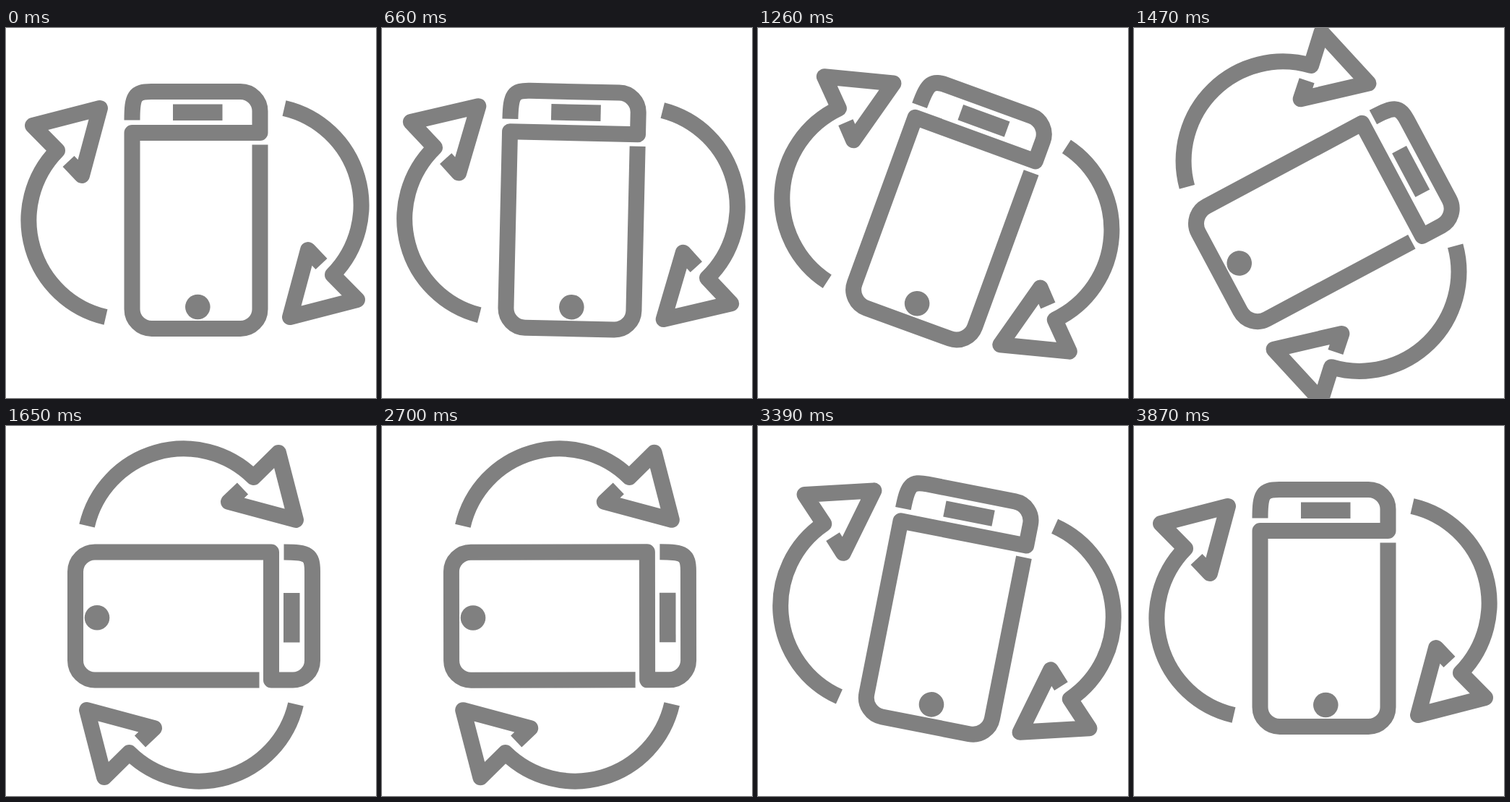
Animation, 512 px wide and 512 px high, one loop 4.38 s. Source, as an HTML page:

```html
<!DOCTYPE html>
<html lang="en">
<head>
<meta charset="utf-8">
<title>Rotate device</title>
<style>
  html, body { margin: 0; width: 100%; height: 100%; overflow: hidden; background: #fff; }
  svg { display: block; width: 100%; height: 100%; }
</style>
</head>
<body>
<svg viewBox="0 0 512 512">
  <g id="icon" fill="none" stroke="#808080" stroke-width="22" stroke-linejoin="round">
    <path d="M351.5 161.5V389A27 27 0 0 1 324.5 416H201.5A27 27 0 0 1 174.5 389V145H351.5V115A27 27 0 0 0 324.5 88H201C178 88 174.5 94 174.5 127.5"/>
    <path id="arrow" d="M138 400A137.5 137.5 0 0 1 71 169.500L37 135L130 111L105 204L86.500 184.500"/>
    <use href="#arrow" transform="rotate(180 261.5 255.5)"/>
    <g fill="#808080" stroke="none">
      <rect x="231" y="105.500" width="68.500" height="22.500"/>
      <circle cx="265.300" cy="386" r="17.300"/>
    </g>
  </g>
</svg>
<script>
const LOOP = 4380, STEP = 30;
const icon = document.getElementById('icon');

function bezier(x1, y1, x2, y2) {
  const at = (s, a, b) => 3 * (1 - s) ** 2 * s * a + 3 * (1 - s) * s * s * b + s ** 3;
  return p => {
    if (p <= 0) return 0;
    if (p >= 1) return 1;
    let lo = 0, hi = 1;
    for (let i = 0; i < 24; i++) {
      const mid = (lo + hi) / 2;
      if (at(mid, x1, x2) < p) lo = mid; else hi = mid;
    }
    return at(lo, y1, y2);
  };
}

const turn = bezier(0.95, 0.088, 0.6, 0.376);
const turnBack = bezier(0.5, 0, 0.14, 0.975);

function draw(now) {
  const t = Math.floor((now % LOOP) / STEP) * STEP;
  const angle = 90 * (turn((t - 510) / 1140) - turnBack((t - 2670) / 1200));
  icon.setAttribute('transform', `rotate(${angle} 256 256)`);
}

const start = performance.now();
function frame() {
  draw(performance.now() - start);
  requestAnimationFrame(frame);
}
frame();
</script>
</body>
</html>
```
